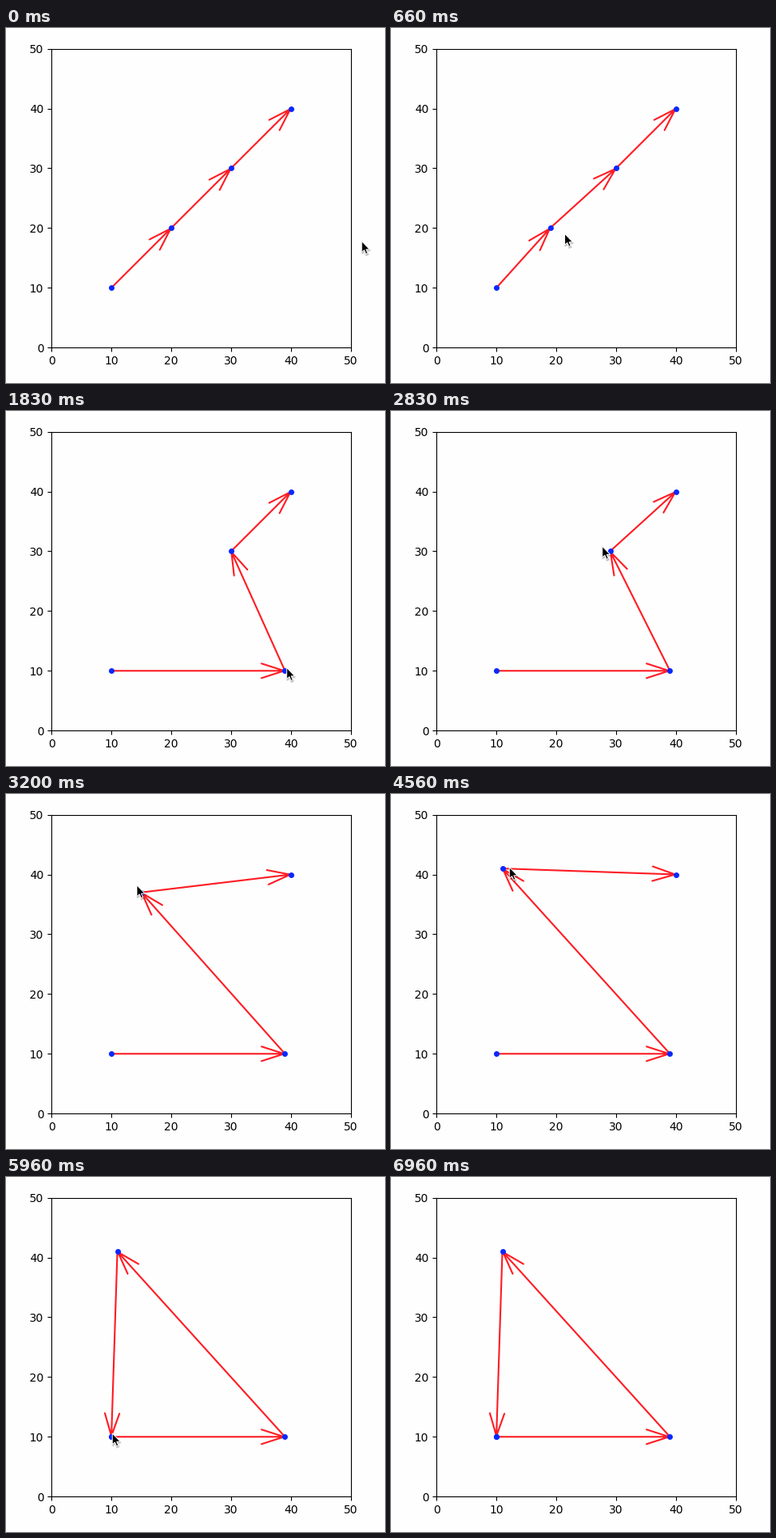
Animation, 468 px wide and 439 px high, one loop 7.96 s. Source, as a matplotlib script:

```python
import numpy as np
import matplotlib.pyplot as plt
from matplotlib.animation import FuncAnimation
from matplotlib.patches import Polygon

W, H, DPI = 468, 439, 100
LOOP, INTERVAL = 7960, 20
X0, Y0, SIDE = 56.2, 395.2, 369.6      # plot area in pixels, y pointing down
UNIT = SIDE / 50
RED, BLUE, PAPER = "#ff1c24", "#0a28ff", "#fefefe"
HEAD_LEN, HEAD_HALF = 29, 9

# Pointer moves in steps of 1/30 s: first, last, x, y, then bend and easing
HOME = np.array([440, 264])
MOVES = [
    (0, 15, 203, 245, 17),
    (19, 41, 336.5, 316, 8, 1, 2.32),
    (45, 55, 347.5, 318),
    (65, 78, 276, 172),
    (84, 106, 138.5, 91, -11, 1, 2.04),
    (136, 137, 147, 91),
    (137, 157, 351.5, 101),
    (161, 184, 131, 318, -21, 2, 5.88),
    (204, 208, 213, 334),
]
POINTER_GONE = 209
DRAGS = {1: (20, 55), 2: (85, 113), 3: (162, 184)}   # point: first, last step


def glide(start, end, u, bend=0, soft=1.5, rush=2.5):
    """Ease along a bowed line; soft slows the start, rush the finish."""
    e = 1 - (1 - u ** soft) ** rush
    d = end - start
    normal = np.array([-d[1], d[0]]) / np.hypot(*d)
    return start + d * e + normal * bend * 4 * e * (1 - e)


def pointer_at(k):
    spot = HOME
    for first, last, x, y, *style in MOVES:
        if k <= first:
            break
        u = min((k - first) / (last - first), 1)
        spot = glide(spot, np.array([x, y]), u, *style)
    return spot


def points_at(k):
    """Dragged points follow the pointer one step late, on whole units."""
    pts = np.array([(v, v) for v in (10, 20, 30, 40)])
    for i, (first, last) in DRAGS.items():
        if k >= first:
            x, y = pointer_at(min(k - 1, last))
            pts[i] = (x - X0) // UNIT, (Y0 - y) // UNIT
    return (X0, Y0) + pts * (UNIT, -UNIT)


def arrow(a, b):
    d = b - a
    u = d / max(np.hypot(*d), 1e-9)
    n = np.array([-u[1], u[0]])
    back = b - HEAD_LEN * u
    tip = b - u
    return np.array([a, tip, (np.nan, np.nan),
                     back + HEAD_HALF * n, tip, back - HEAD_HALF * n])


fig = plt.figure(figsize=((W + 1e-6) / DPI, (H + 1e-6) / DPI), dpi=DPI,
                 facecolor=PAPER)
ax = fig.add_axes([X0 / W, 1 - Y0 / H, SIDE / W, SIDE / H], facecolor=PAPER)
ax.set(xlim=(0, 50), ylim=(0, 50),
       xticks=range(0, 51, 10), yticks=range(0, 51, 10))

top = fig.add_axes([0, 0, 1, 1])
top.set(xlim=(0, W), ylim=(H, 0))
top.axis("off")

arrows = [top.plot([], [], color=RED, lw=1.5, solid_capstyle="round",
                   solid_joinstyle="round")[0] for _ in range(3)]
dots, = top.plot([], [], "o", color=BLUE, ms=5, mew=0, zorder=3)

SHAPE = np.array([(0, 0), (0, 14), (3.2, 11.1), (5.3, 16), (7.5, 15),
                  (5.5, 10.3), (9.9, 10.3)]) - (0.8, 0.5)
shadow = Polygon(SHAPE, fc="black", ec="black", lw=1.5, alpha=0.17, zorder=4)
cursor = Polygon(SHAPE, fc="black", ec="white", lw=0.7, zorder=5)
for patch in (shadow, cursor):
    top.add_patch(patch)


def draw(n):
    t = n * INTERVAL + INTERVAL / 2
    k = int((t + 9.9) * 0.03)
    pts = points_at(k)
    for line, a, b in zip(arrows, pts, pts[1:]):
        line.set_data(*arrow(a, b).T)
    dots.set_data(*pts.T)
    tip = pointer_at(k)
    cursor.set_xy(SHAPE + tip)
    shadow.set_xy(SHAPE + tip + (0.5, 1.5))
    for patch in (shadow, cursor):
        patch.set_visible(k < POINTER_GONE)
    return [*arrows, dots, shadow, cursor]


anim = FuncAnimation(fig, draw, frames=LOOP // INTERVAL, interval=INTERVAL,
                     init_func=lambda: draw(0), repeat=True, repeat_delay=0)
plt.show()
```
